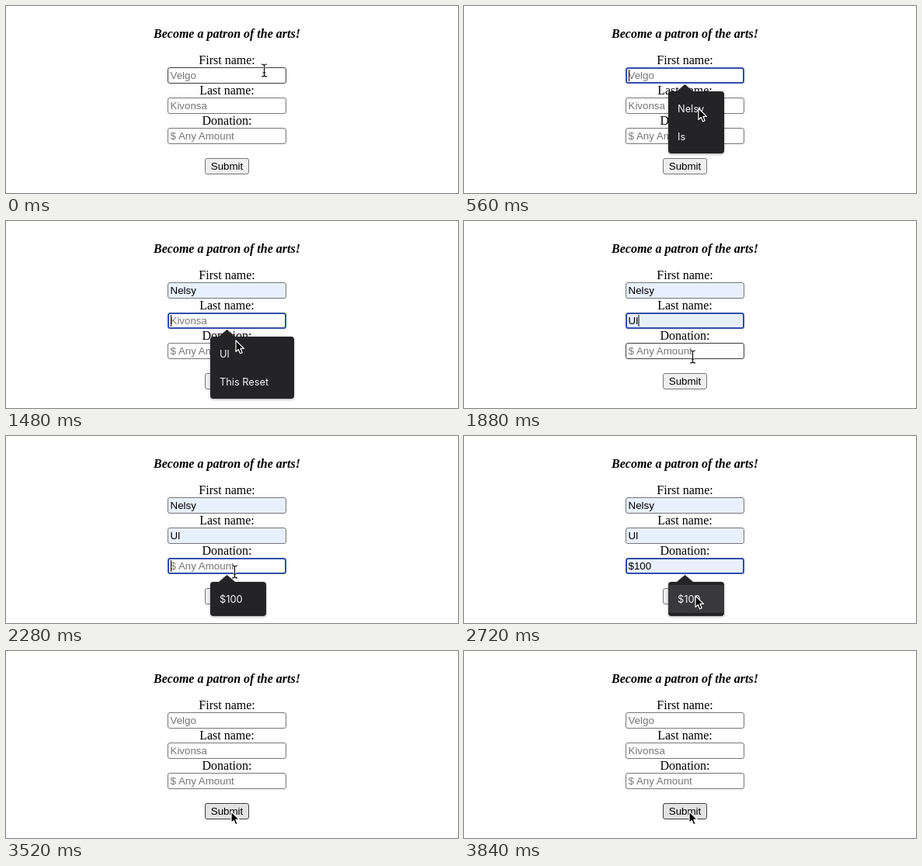
Animation of 582 by 241 pixels, one loop 4160 ms. Source, as an HTML page:

```html
<!DOCTYPE html>
<html lang="en">
<head>
<meta charset="utf-8">
<title>Donation form</title>
<style>
  html, body { margin: 0; width: 100%; height: 100%; overflow: hidden; background: #fff; }
  svg { display: block; }
  .label { font: 16px "Liberation Serif", serif; text-anchor: middle; }
  .title { font-weight: bold; font-style: italic; }
  .input { font: 13.333px "Liberation Sans", sans-serif; }
  .mid { text-anchor: middle; }
  .item { font: 12.8px Inter, sans-serif; fill: #f2f2f2; }
  .popup { filter: drop-shadow(0 1px 1.5px rgba(0, 0, 0, .35)); }
</style>
</head>
<body>
<svg id="stage" width="582" height="241" viewBox="0 0 582 241"></svg>
<script>
const LOOP = 4160, CLEAR = 3440, PRESS = 3320;
const CENTER = 284.5;

// Times in ms: focus and popup are [start, end], fill is when the value appears.
const fields = [
  { y: 79, label: 'First name:', hint: 'Velgo', value: 'Nelsy', caret: 245.5,
    items: ['Nelsy', 'Is'], width: 72, focus: [400, 1200], popup: [400, 1200], fill: 760, hover: [0, 400] },
  { y: 118, label: 'Last name:', hint: 'Kivonsa', value: 'Ul', caret: 224.5,
    items: ['Ul', 'This Reset'], width: 108, focus: [1200, 2240], popup: [1200, 1840], fill: 1520, hover: [0, 0] },
  { y: 157, label: 'Donation:', hint: '$ Any Amount', value: '$100', caret: 241.5,
    items: ['$100'], width: 72, focus: [2240, PRESS], popup: [2240, 2920], fill: 2640, hover: [1880, 2240] }
];

// Pointer stops: time, shape, x, y
const pointer = [
  [0, 'beam', 332.5, 83], [400, 'beam', 331, 85], [480, 'arrow', 316, 112], [560, 'arrow', 302, 132],
  [760, 'arrow', 300, 130], [800, 'arrow', 298, 128], [840, 'arrow', 297, 126], [1040, 'arrow', 297, 121],
  [1400, 'arrow', 296, 138], [1480, 'arrow', 296, 154], [1520, 'arrow', 295, 160],
  [1600, 'arrow', 294, 166], [1680, 'arrow', 294, 168], [1880, 'beam', 294.5, 175],
  [2560, 'beam', 294.5, 178], [2600, 'arrow', 295, 188], [2640, 'arrow', 296, 196],
  [2680, 'arrow', 297, 203], [2720, 'arrow', 298, 206], [2920, 'arrow', 297, 207],
  [2960, 'arrow', 295, 208], [3040, 'arrow', 292, 208], [3160, 'arrow', 290, 207]
];

const shapes = {
  arrow: `<path d="M0 0V14.5L3.3 11.4 5.6 16.8 8.2 15.7 5.9 10.4H10.4Z"
    stroke="#fff" stroke-width="1.2" stroke-linejoin="round"/>`,
  beam: ['#fff" stroke-width="2.4', '#000" stroke-width="1.1'].map(s =>
    `<path d="M-3.5-8Q0-8 0-6Q0-8 3.5-8M0-6V6M-3.5 8Q0 8 0 6Q0 8 3.5 8M-2 3H2" fill="none" stroke="${s}"/>`).join('')
};

const within = (t, [from, to]) => t >= from && t < to;
const text = (x, y, cls, s, fill = '#000') => `<text x="${x}" y="${y}" class="${cls}" fill="${fill}">${s}</text>`;
const rect = (x, y, w, h, r, fill, extra = '') =>
  `<rect x="${x}" y="${y}" width="${w}" height="${h}" rx="${r}" fill="${fill}" ${extra}/>`;
const box = (x, y, w, h, r, fill, stroke, line = 1) =>
  rect(x + line / 2, y + line / 2, w - line, h - line, r, fill, `stroke="${stroke}" stroke-width="${line}"`);

function field(f, t) {
  const filled = within(t, [f.fill, CLEAR]);
  const focused = within(t, f.focus);
  const caret = focused && !(filled && within(t, f.popup));
  const border = focused ? '#2f4fac' : within(t, f.hover) ? '#3c3c3c' : '#767676';
  return text(CENTER, f.y - 4, 'label', f.label)
    + box(208, f.y, 153, 21, 2.5, filled ? '#e8f0fe' : '#fff', border, focused ? 2 : 1)
    + text(211.5, f.y + 15, 'input', filled ? f.value : f.hint, filled ? '#000' : '#757575')
    + (caret ? rect(filled ? f.caret : 212, f.y + 3, 1, 15, 0, '#000') : '');
}

function popup(f, t) {
  if (!within(t, f.popup)) return '';
  const top = f.y + 31;
  return `<g class="popup">${rect(263, top, f.width, 8 + 36 * f.items.length, 4, '#242426')}
    <path d="M274 ${top}L${CENTER} ${top - 9}L295 ${top}Z" fill="#242426"/></g>`
    + (t >= f.fill ? rect(263, top + 4, f.width, 36, 0, '#39393b') : '')
    + f.items.map((s, i) => text(275, top + 26.7 + 36 * i, 'item', s, '#f2f2f2')).join('');
}

function draw(now) {
  const t = now % LOOP;
  const pressed = t >= PRESS;
  const [, shape, x, y] = pointer.findLast(p => p[0] <= t);
  stage.innerHTML = text(CENTER, 41, 'label title', 'Become a patron of the arts!')
    + fields.map(f => field(f, t)).join('')
    + box(256, 196, 57, 21, 2.5, pressed ? '#e3e3e3' : '#efefef', pressed ? '#3c3c3c' : '#767676')
    + text(CENTER, 211, 'input mid', 'Submit')
    + fields.map(f => popup(f, t)).join('')
    + `<g transform="translate(${x} ${y})">${shapes[shape]}</g>`;
}

const stage = document.getElementById('stage');
const start = performance.now();
function tick() {
  draw(performance.now() - start);
  requestAnimationFrame(tick);
}
tick();
</script>
</body>
</html>
```
